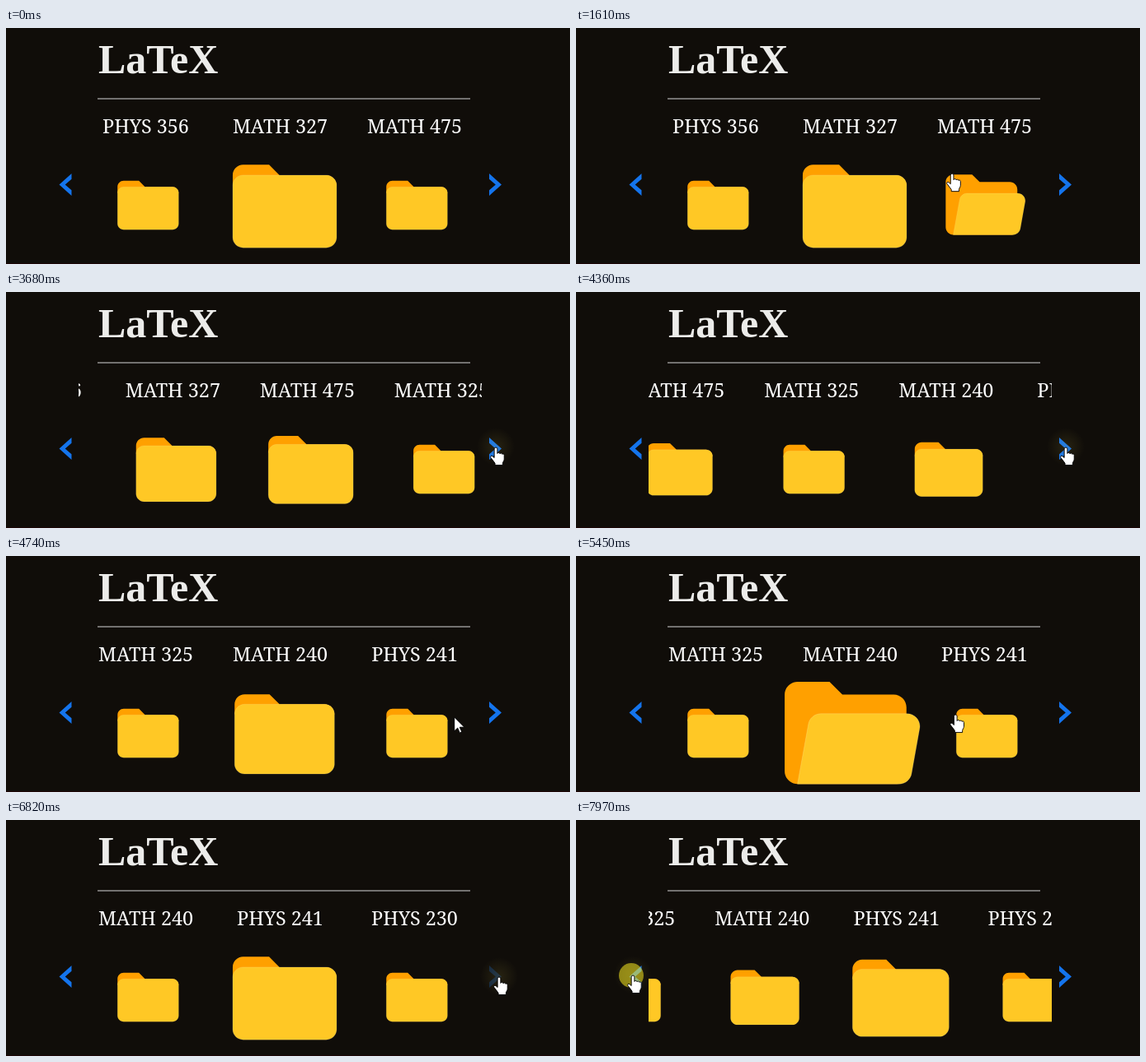
An HTML page that plays this animation: 684 by 287 pixels, repeating every 7990 ms.

```html
<!DOCTYPE html>
<html lang="en">
<head>
<meta charset="utf-8">
<title>LaTeX carousel</title>
<style>
  html, body { margin: 0; height: 100%; overflow: hidden; background: #100d09; }
  svg { display: block; width: 684px; height: 287px; }
  .title { font: 700 50px "Liberation Serif", serif; fill: #ececea; }
  .label { font: 500 23.4px "Noto Serif", serif; fill: #fff; text-anchor: middle; }
  .back { fill: #ffa000; }
  .front { fill: #ffc825; stroke: #fff0b8; stroke-opacity: .3; stroke-width: .2; }
  .nav { fill: #1474ec; }
</style>
</head>
<body>
<svg viewBox="0 0 684 287">
  <defs>
    <clipPath id="view"><rect x="88" y="100" width="489" height="187"/></clipPath>
    <radialGradient id="glow">
      <stop offset="0" stop-color="#d8c850" stop-opacity=".12"/>
      <stop offset="1" stop-color="#d8c850" stop-opacity="0"/>
    </radialGradient>
    <g id="closed">
      <path class="back" d="M40 12H22l-4-4H8c-2.2 0-4 1.8-4 4v4h40c0-2.2-1.8-4-4-4z"/>
      <path class="front" d="M40 12H8c-2.2 0-4 1.8-4 4v20c0 2.2 1.8 4 4 4h32c2.2 0 4-1.8 4-4V16c0-2.2-1.8-4-4-4z"/>
    </g>
    <g id="open">
      <path class="back" d="M38 12H22l-4-4H8c-2.2 0-4 1.8-4 4v24c0 2.2 1.8 4 4 4h31c1.7 0 3-1.3 3-3V16c0-2.2-1.8-4-4-4z"/>
      <path class="front" d="M42.2 18H15.3c-1.9 0-3.6 1.4-3.9 3.3L8 40h31.7c1.9 0 3.6-1.4 3.9-3.3l2.5-14c.5-2.4-1.4-4.7-3.9-4.7z"/>
    </g>
  </defs>
  <rect width="684" height="287" fill="#100d09"/>
  <rect y="286" width="684" height="1" fill="#1c0505"/>
  <text class="title" x="112" y="55">LaTeX</text>
  <rect x="111" y="85" width="452" height="2" fill="#737170"/>
  <g id="slides" clip-path="url(#view)"></g>
  <path class="nav" d="M79.5 177v6.8l-7.8 6.7 7.8 6.7v6.8l-15-13.5z"/>
  <path class="nav" id="next" d="M586 177v6.8l7.8 6.7-7.8 6.7v6.8l15-13.5z"/>
  <g id="cursor">
    <circle id="halo" cy="-2" r="23" fill="url(#glow)"/>
    <circle id="press" cx="-2" cy="-1" r="15" fill="#ffef20"/>
    <g fill="#fff" stroke="#000" stroke-linejoin="round">
      <path id="hand" transform="translate(0 -1) scale(.93)" d="M-2 2a2 2 0 0 1 4 0v6c0-1.6 3.4-1.4 3.4.4c.3-1.3 3-1 3 .6c.6-.9 2.6-.6 2.6 1.2v5c0 2-1.6 3.5-2 5.5v2.5h-10v-2.5c-1.4-2-4-5-5.6-7.4c-1-1.6.8-3.2 2.4-1.8l2.2 2z"/>
      <path id="pointer" d="M0 0v17l4-3.8 2.6 6 2.6-1.1-2.6-5.8h5.6z"/>
    </g>
  </g>
</svg>
<script>
const LOOP = 7990, SLIDE_MS = 500, ZOOM_MS = 770, HOVER_LAG = 30;
const FIRST = 1, LAST = 5, BIG = 1.7, PITCH = 163;
const LABELS = ["PHYS 356", "MATH 327", "MATH 475", "MATH 325", "MATH 240", "PHYS 241", "PHYS 230"];

// Arrow clicks: when the slide starts, where it goes, how long the button stays down.
const CLICKS = [
  { start: 3433, to: 2, held: 60 },
  { start: 3898, to: 3, held: 60 },
  { start: 4255, to: 4, held: 60 },
  { start: 6050, to: 5, held: 60 },
  { start: 7860, to: 4, held: 200 }
];
// Cursor key points: [time, x, y]
const PATH = [
  [360, 345, -20], [700, 340, 200], [1200, 345, 225], [1450, 430, 200], [1610, 456, 178],
  [2000, 500, 220], [2790, 594, 190], [4640, 594, 190], [5150, 340, 220], [5430, 395, 205],
  [5450, 460, 194], [5980, 598, 192], [7060, 598, 192], [7750, 69, 190], [LOOP, 69, 190]
];

const byId = id => document.getElementById(id);
const clamp = v => Math.max(0, Math.min(1, v));

// CSS "ease": cubic-bezier(.25, .1, .25, 1)
function ease(x) {
  if (x <= 0 || x >= 1) return clamp(x);
  let lo = 0, hi = 1, u;
  for (let i = 0; i < 20; i++) {
    u = (lo + hi) / 2;
    const bx = .75 * u * (1 - u) + u * u * u;
    if (bx < x) lo = u; else hi = u;
  }
  return .3 * u * (1 - u) ** 2 + 3 * u * u * (1 - u) + u ** 3;
}

// A new target takes over from wherever the value is.
function track(value, steps, ms, t) {
  let from = value, to = value, began = 0;
  const at = time => from + (to - from) * ease((time - began) / ms);
  for (const [time, target] of steps) {
    if (time > t) break;
    if (target === to) continue;
    from = at(time);
    to = target;
    began = time;
  }
  return at(t);
}

const moves = CLICKS.map(c => [c.start, c.to]);

// A slide that a quick second click skips past does not grow.
const skipped = k => k + 1 < CLICKS.length && CLICKS[k + 1].start - CLICKS[k].start < .8 * SLIDE_MS;
const zooms = LABELS.map((_, i) =>
  CLICKS.map((c, k) => [c.start, c.to === i && !skipped(k) ? BIG : 1]));

const slideX = (i, t) => 332.5 + PITCH * (i - track(FIRST, moves, SLIDE_MS, t));
const slideZoom = (i, t) => track(i === FIRST ? BIG : 1, zooms[i], ZOOM_MS, t);

function cursorAt(t) {
  const i = PATH.findIndex(p => p[0] > t);
  if (i < 1) return null;
  const [t0, x0, y0] = PATH[i - 1], [t1, x1, y1] = PATH[i];
  const k = (t - t0) / (t1 - t0);
  return [x0 + (x1 - x0) * k, y0 + (y1 - y0) * k];
}

function isHovered(i, t) {
  const spot = cursorAt(t - HOVER_LAG);
  if (!spot) return false;
  const [x, y] = spot, zoom = slideZoom(i, t);
  return x > 88 && x < 577 && Math.abs(x - slideX(i, t)) < 48 * zoom && Math.abs(y - 215) < 38 * zoom;
}

function add(parent, tag, attrs, text = "") {
  const el = document.createElementNS("http://www.w3.org/2000/svg", tag);
  for (const key in attrs) el.setAttribute(key, attrs[key]);
  el.textContent = text;
  return parent.appendChild(el);
}

const slides = LABELS.map(label => {
  const group = add(byId("slides"), "g", {});
  add(group, "text", { class: "label", y: 128 }, label);
  return { group, icon: add(group, "use", {}) };
});

function drawSlide({ group, icon }, i, t) {
  const zoom = slideZoom(i, t), open = isHovered(i, t);
  const [dx, y, dy, size, mid] = open ? [2.1, 214.4, .4, 2.286, 25.1] : [3.8, 213.7, 1.8, 1.853, 24];
  group.setAttribute("transform", `translate(${slideX(i, t)})`);
  icon.setAttribute("href", open ? "#open" : "#closed");
  icon.setAttribute("transform",
    `translate(${dx * zoom - 1} ${y + dy * zoom}) scale(${size * zoom}) translate(${-mid} -24)`);
}

function drawCursor(t) {
  const spot = cursorAt(t);
  byId("cursor").style.display = spot ? "" : "none";
  if (!spot) return;
  const [x, y] = spot;
  const onNav = x > 582 || x < 84;
  const onLink = onNav || LABELS.some((_, i) => isHovered(i, t));
  const pressed = CLICKS.some(c => t >= c.start - 40 && t < c.start + c.held);
  byId("cursor").setAttribute("transform", `translate(${x} ${y})`);
  byId("halo").style.opacity = onNav ? 1 : 0;
  byId("press").style.opacity = pressed ? .53 : 0;
  byId("hand").style.display = onLink ? "" : "none";
  byId("pointer").style.display = onLink ? "none" : "";
}

function draw(t) {
  slides.forEach((slide, i) => drawSlide(slide, i, t));
  const centre = CLICKS.reduce((now, c) => t >= c.start ? c.to : now, FIRST);
  byId("next").style.opacity = centre === LAST ? .25 : 1;
  drawCursor(t);
}

const began = performance.now();
function tick() {
  draw((performance.now() - began) % LOOP);
  requestAnimationFrame(tick);
}
tick();
</script>
</body>
</html>
```
